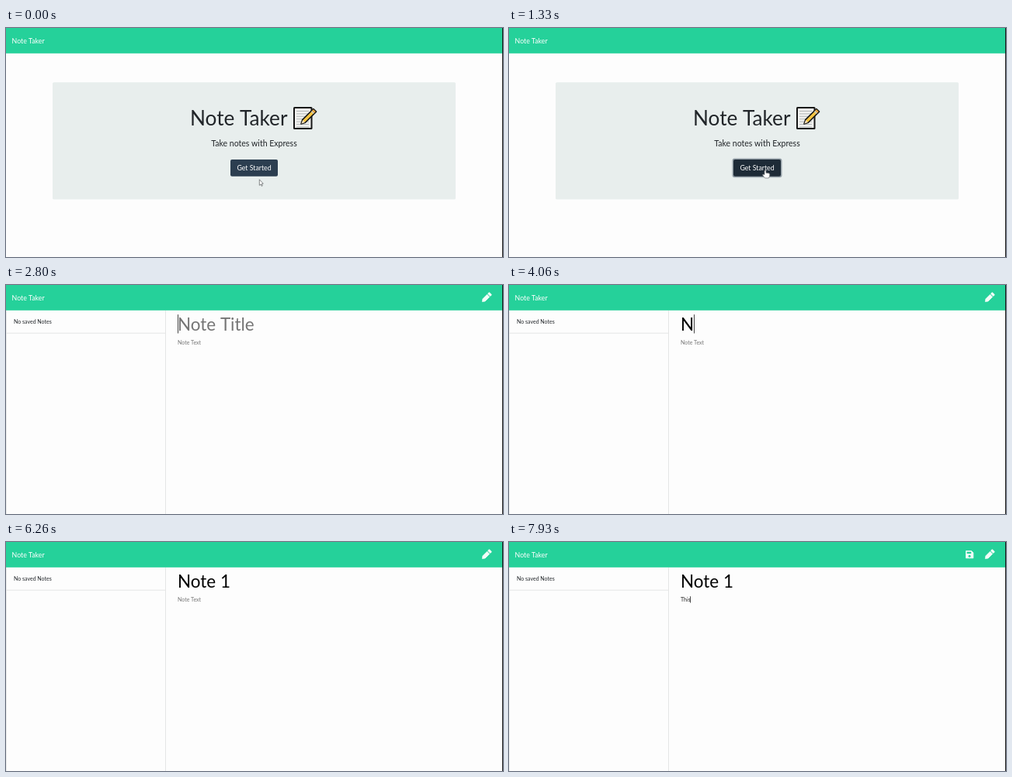
Write an HTML page with a canvas that moves like this. It is 640x296 px and loops after 8000 ms.

```html
<!DOCTYPE html>
<html lang="en">
<head>
<meta charset="utf-8">
<title>Note Taker</title>
<style>
  html, body { margin: 0; width: 100%; height: 100%; overflow: hidden; background: #fdfdfd; }
  canvas { display: block; width: 640px; height: 296px; }
</style>
</head>
<body>
<canvas id="stage"></canvas>
<script>
const W = 640, H = 296, LOOP = 8000;
const PAGE_AT = 1400, LIST_AT = 1470, SAVE_AT = 7400;
const GREEN = '#25d19a', GREY = '#757575', LINE = '#e4e5e5', ICON = '#f2fcf8';

const canvas = document.getElementById('stage');
const ctx = canvas.getContext('2d');
const dpr = window.devicePixelRatio || 1;
canvas.width = W * dpr;
canvas.height = H * dpr;

const titleKeys = [[4000, 'N'], [4260, 'o'], [4460, 't'], [4800, 'e'], [5330, ' '], [5530, '1']];
const bodyKeys = [[7330, 'T'], [7530, 'h'], [7660, 'i'], [7860, 's']];

const clamp = v => Math.max(0, Math.min(1, v));
const ease = v => v * v * (3 - 2 * v);
const progress = (t, from, to) => ease(clamp((t - from) / (to - from)));
const mix = (a, b, k) => a + (b - a) * k;

function rect(x, y, w, h, color) {
  ctx.fillStyle = color;
  ctx.fillRect(x, y, w, h);
}

function rounded(x, y, w, h, r, color) {
  ctx.beginPath();
  ctx.roundRect(x, y, w, h, r);
  ctx.fillStyle = color;
  ctx.fill();
}

function poly(points, fill, stroke, width = 1) {
  ctx.beginPath();
  points.forEach(([x, y]) => ctx.lineTo(x, y));
  ctx.closePath();
  if (fill) { ctx.fillStyle = fill; ctx.fill(); }
  if (stroke) { ctx.strokeStyle = stroke; ctx.lineWidth = width; ctx.stroke(); }
}

function text(str, x, y, size, color, align = 'left') {
  ctx.font = size + 'px Lato, sans-serif';
  ctx.textAlign = align;
  ctx.fillStyle = color;
  ctx.fillText(str, x, y);
}

function at(x, y, angle, draw) {
  ctx.save();
  ctx.translate(x, y);
  ctx.rotate(angle);
  ctx.lineJoin = 'round';
  draw();
  ctx.restore();
}

function memo() {
  rounded(370, 102, 24.5, 29, 1.5, '#161616');
  rect(372, 104, 20.5, 25, '#f1f1ef');
  for (let y = 107; y < 128; y += 3.4) rect(374, y, 16, 1, '#b4b8b8');
  at(380, 124, -Math.PI / 4, () => {
    poly([[0, 0], [5, -2.6], [25, -2.6], [25, 2.6], [5, 2.6]], '#f6c643', '#161616', 1.6);
    poly([[0.5, 0], [5, -2], [5, 2]], '#f3dfba');
    rect(20.5, -2, 1.5, 4, '#c9cccc');
    rect(22, -2, 2.5, 4, '#e5a23c');
  });
}

function pencilIcon() {
  at(613.3, 21.6, -Math.PI / 4, () => {
    poly([[0, 0], [3, -2.2], [11, -2.2], [11, 2.2], [3, 2.2]], ICON, ICON, 0.7);
    rounded(12, -2.6, 3.3, 5.2, 1, ICON);
  });
}

function saveIcon() {
  poly([[588.5, 11.5], [595.5, 11.5], [597.8, 13.8], [597.8, 20.8], [588.5, 20.8]], ICON, ICON, 0.9);
  rect(589.6, 12.7, 5.6, 2.3, GREEN);
  ctx.beginPath();
  ctx.arc(593, 18.2, 1.5, 0, Math.PI * 2);
  ctx.fillStyle = GREEN;
  ctx.fill();
}

function arrow(x, y) {
  at(x, y, 0, () => poly([[0, 0], [0, 7.6], [1.7, 6.1], [2.9, 8.6], [4, 8.1], [2.9, 5.6], [5, 5.4]],
    '#fff', '#55595b', 0.7));
}

function hand(x, y) {
  at(x, y, 0, () => {
    ctx.beginPath();
    ctx.moveTo(-1, 5.4);
    ctx.lineTo(-1, 0.6);
    ctx.quadraticCurveTo(0, -1, 1, 0.6);
    ctx.lineTo(1, 3.3);
    ctx.quadraticCurveTo(5.8, 3.4, 5.8, 5);
    ctx.quadraticCurveTo(5.9, 8, 4.4, 10);
    ctx.lineTo(-0.4, 10);
    ctx.quadraticCurveTo(-2, 8.2, -3.4, 6);
    ctx.quadraticCurveTo(-3, 4.2, -1, 5.9);
    ctx.fillStyle = '#fff';
    ctx.fill();
    ctx.strokeStyle = '#6c6f70';
    ctx.lineWidth = 0.7;
    ctx.stroke();
  });
}

function beam(x, y) {
  at(x, y, 0, () => {
    ctx.strokeStyle = '#d8d9d9';
    ctx.lineWidth = 0.8;
    for (const side of [-1, 1]) {
      ctx.beginPath();
      ctx.moveTo(side * 0.8, -3);
      ctx.lineTo(side * 3, -2.6);
      ctx.moveTo(side * 0.8, 3);
      ctx.lineTo(side * 3, 2.6);
      ctx.moveTo(side * 2.8, -1.4);
      ctx.lineTo(side * 2.8, 1.4);
      ctx.stroke();
    }
  });
}

function home(t) {
  rounded(60, 70.3, 519, 151.2, 1.5, '#e8eeed');
  text('Note Taker', 237, 125.7, 26.2, '#212529');
  memo();
  text('Take notes with Express', 319.5, 152.8, 10.52, '#212529', 'center');

  const move = progress(t, 60, 460);
  const x = mix(326.3, 330, move), y = mix(195.8, 184, move);
  const hover = progress(t, 260, 410);
  if (t >= 1200) rounded(287.5, 168.6, 64, 24.6, 3, '#95a0a8');
  const tone = [[44, 30], [62, 43], [80, 55]].map(([a, b]) => Math.round(mix(a, b, hover)));
  rounded(289, 170.1, 61, 21.6, 2, `rgb(${tone})`);
  text('Get Started', 319.5, 184.1, 8.77, '#fff', 'center');
  if (y < 190.5) hand(x, y); else arrow(x, y);
}

// Value typed so far, and the time of the latest key.
function typed(keys, t) {
  const done = keys.filter(([time]) => time <= t);
  return { value: done.map(k => k[1]).join(''), last: done.length ? done[done.length - 1][0] : 0 };
}

function field(keys, t, hint, y, size, ink, focus) {
  const { value, last } = typed(keys, t);
  text(value || hint, 221, y, size, value ? ink : GREY);
  if (!focus) return;
  const visible = Math.floor((t - Math.max(focus, last)) / 500) % 2 === 0;
  if (visible) {
    const x = 221 + (value ? ctx.measureText(value).width : 0);
    const h = size * 1.04 + 1;
    rect(Math.floor(x), y - size * 0.387 - h / 2, 1, h, '#444');
  }
}

function notes(t) {
  rect(0, 33, 0.8, H - 33, LINE);
  rect(205, 33, 1, H - 33, LINE);
  if (t >= LIST_AT) {
    text('No saved Notes', 10, 49.9, 7.01, '#212529');
    rect(0, 61.7, 205, 1, LINE);
  }
  const inBody = t >= 6700;
  field(titleKeys, t, 'Note Title', 59, 22.44, '#000', !inBody && t >= 2600 && 2600);
  field(bodyKeys, t, 'Note Text', 77.1, 7.01, '#222', inBody && 6700);
  pencilIcon();
  if (t >= SAVE_AT) saveIcon();
  if (t < 1930) hand(330, 184);
  if (t >= 6460 && t < 7260) {
    const k = progress(t, 6460, 6700);
    beam(mix(316, 317.8, k), mix(100, 88, k));
  }
}

function draw(t) {
  ctx.setTransform(dpr, 0, 0, dpr, 0, 0);
  rect(0, 0, W, H, '#fdfdfd');
  rect(0, 0, W, 32.8, GREEN);
  text('Note Taker', 7.6, 19.5, 8.77, '#fff');
  if (t < PAGE_AT) home(t); else notes(t);
  rect(639, 0, 1, H, '#151515');
}

const start = performance.now();
function tick() {
  draw((performance.now() - start) % LOOP);
  requestAnimationFrame(tick);
}
tick();
</script>
</body>
</html>
```
